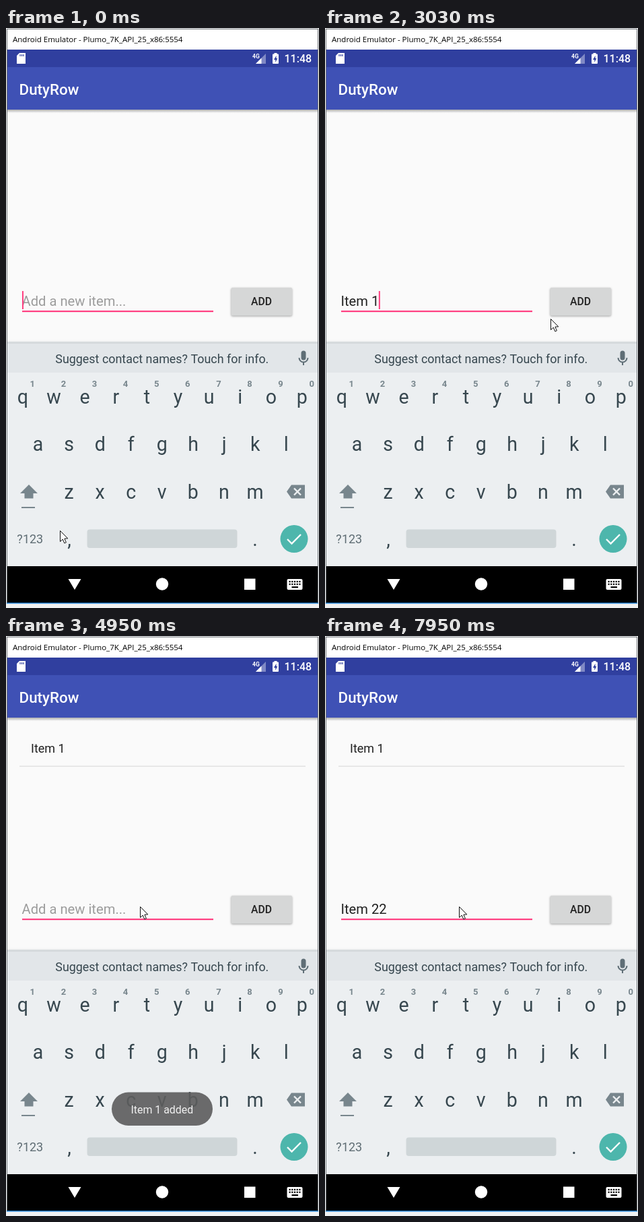
An HTML page with a canvas for the animation above (8000 ms loop, 465 by 860 pixels).

```html
<!DOCTYPE html>
<html lang="en">
<head>
<meta charset="utf-8">
<style>
html, body { margin: 0; width: 100%; height: 100%; overflow: hidden; background: #fafafa; }
canvas { display: block; }
</style>
</head>
<body>
<canvas id="stage" width="465" height="860"></canvas>
<script>
const ctx = document.getElementById('stage').getContext('2d');
const LOOP = 8000;
const INK = '#37474f', KEY_ICON = '#78868d', KEYBOARD = '#eceff1', ACCENT = '#ff4081';

// Each track holds its value until the next start time.
const typed = [[0, ''], [1240, 'I'], [1360, 'It'], [1480, 'Ite'], [1600, 'Item'], [1750, 'Item 1'],
  [3570, ''], [5620, 'I'], [5770, 'It'], [5920, 'Ite'], [6080, 'Item'], [6350, 'Item 2'], [6500, 'Item 22']];
const caretFlips = [400, 960, 2340, 2760, 3310, 3570, 3990, 4410, 4950, 5620, 7020, 7520, 7950];
const toastAlpha = [[0, 0], [3870, 0.35], [3990, 0.75], [4140, 1], [5620, 0.92], [5770, 0.4], [5920, 0]];
const pointer = [[0, [80, 745]], [2460, [72, 679]], [2610, [77, 664]], [2760, [144, 548]], [2910, [250, 480]],
  [3030, [335, 431]], [3180, [350, 418]], [3310, [362, 412]], [3990, [290, 412]], [4140, [215, 408]],
  [4410, [202, 401]], [4680, [199, 401]]];

const at = (track, t) => track.findLast(([start]) => start <= t)[1];

function rect(x, y, w, h, color) {
  ctx.fillStyle = color;
  ctx.fillRect(x, y, w, h);
}
function round(x, y, w, h, r, color) {
  ctx.fillStyle = color;
  ctx.beginPath();
  ctx.roundRect(x, y, w, h, r);
  ctx.fill();
}
function disc(x, y, r, color) {
  ctx.fillStyle = color;
  ctx.beginPath();
  ctx.arc(x, y, r, 0, 7);
  ctx.fill();
}
function trace(points) {
  ctx.beginPath();
  points.forEach(([x, y]) => ctx.lineTo(x, y));
}
function poly(points, color) {
  trace(points);
  ctx.closePath();
  ctx.fillStyle = color;
  ctx.fill();
}
function line(points, color, width) {
  trace(points);
  ctx.strokeStyle = color;
  ctx.lineWidth = width;
  ctx.stroke();
}
function text(str, x, y, size, color, { weight = 400, align = 'left', family = 'Roboto' } = {}) {
  ctx.font = `${weight} ${size}px "${family}", sans-serif`;
  ctx.textAlign = align;
  ctx.fillStyle = color;
  ctx.fillText(str, x, y);
}
function fade(y, h, from, to) {
  const g = ctx.createLinearGradient(0, y, 0, y + h);
  g.addColorStop(0, from);
  g.addColorStop(1, to);
  rect(2, y, 461, h, g);
}

function drawWindow() {
  rect(0, 0, 465, 860, '#f1f2f3');
  rect(1, 1, 463, 852, '#707478');
  rect(2, 2, 461, 30, '#fff');
  text('Android Emulator - Plumo_7K_API_25_x86:5554', 10, 21, 11.5, '#000', { family: 'Open Sans' });
  rect(2, 32, 461, 433, '#fafafa');
  rect(1, 852, 463, 1.5, '#1979ca');
}

function drawStatusBar() {
  rect(2, 32, 461, 26, '#303f9f');
  poly([[20, 37], [29, 37], [29, 53], [16, 53], [16, 41]], '#fff');
  for (const x of [20.5, 23, 25.5]) rect(x, 39, 1.2, 3, '#303f9f');
  text('4G', 366, 45, 8.5, '#fff', { weight: 700 });
  poly([[386, 38], [386, 53], [371, 53]], '#8089c5');
  poly([[379.5, 44.5], [379.5, 53], [371, 53]], '#fff');
  rect(398.5, 37, 4, 2, '#fff');
  round(396, 38.5, 9, 14.5, 1, '#fff');
  poly([[401.5, 41], [398, 47], [400.3, 47], [400.3, 51], [403.3, 45], [401.5, 45]], '#303f9f');
  text('11:48', 413.5, 51, 16, '#fff', { weight: 500 });
}

function drawAppBar() {
  rect(2, 58, 461, 63, '#3f51b5');
  fade(121, 5, 'rgba(0,0,0,.3)', 'rgba(0,0,0,0)');
  text('DutyRow', 19.5, 98.5, 22.4, '#fff', { weight: 500 });
}

function drawList() {
  text('Item 1', 37, 173, 18, '#212121');
  rect(20, 192.5, 425, 1.3, '#dedede');
}

function drawInput(value, caret) {
  text(value || 'Add a new item...', 23.5, 411.5, 20.2, value ? '#212121' : '#9c9c9c');
  rect(24, 419, 284, 2.2, ACCENT);
  if (caret) rect(value ? 23.5 + ctx.measureText(value).width - 0.5 : 24, 390, 2, 27, ACCENT);
}

function drawButton(pressed) {
  ctx.save();
  ctx.shadowColor = 'rgba(0,0,0,.35)';
  ctx.shadowBlur = pressed ? 6 : 3;
  ctx.shadowOffsetY = pressed ? 2 : 1;
  round(334.5, 385, 90.5, 41.5, 2.2, pressed ? '#c3c4c4' : '#d6d7d7');
  ctx.restore();
  text('ADD', 379.5, 411, 15.7, '#212121', { weight: 500, align: 'center' });
}

function drawSuggestions() {
  rect(2, 465, 461, 46, '#e2e6e9');
  fade(462, 6, 'rgba(0,0,0,0)', 'rgba(0,0,0,.07)');
  text('Suggest contact names? Touch for info.', 231.8, 497, 17.9, INK, { align: 'center' });
  const gray = '#5f6e76';
  round(438.5, 478.5, 7, 14, 3.5, gray);
  ctx.strokeStyle = gray;
  ctx.lineWidth = 2;
  ctx.beginPath();
  ctx.arc(442, 489, 6.5, 0, Math.PI);
  ctx.stroke();
  rect(441, 495, 2, 5, gray);
}

function drawKeyRow(letters, x, y) {
  [...letters].forEach((c, i) => text(c, x + i * 46.1, y, 28.6, INK, { align: 'center' }));
}

function drawKeyboard() {
  rect(2, 511, 461, 287, KEYBOARD);
  drawKeyRow('qwertyuiop', 25, 556.5);
  drawKeyRow('asdfghjkl', 47.5, 627);
  drawKeyRow('zxcvbnm', 93.5, 697.5);
  drawKeyRow(',', 94, 767.5);
  drawKeyRow('.', 370, 767.5);
  [...'1234567890'].forEach((c, i) =>
    text(c, 39.3 + i * 46.1, 532, 13, KEY_ICON, { weight: 700, align: 'center' }));

  poly([[34, 677], [47, 690], [40.5, 690], [40.5, 697.5], [27.5, 697.5], [27.5, 690], [21, 690]], KEY_ICON);
  rect(23, 710, 20, 2, KEY_ICON);
  poly([[417, 687.5], [424, 677.5], [444, 677.5], [444, 697.5], [424, 697.5]], KEY_ICON);
  line([[428, 682.5], [438, 692.5]], KEYBOARD, 2.4);
  line([[438, 682.5], [428, 692.5]], KEYBOARD, 2.4);

  text('?123', 35.8, 764, 18, '#5f6d74', { align: 'center' });
  round(120.5, 743.5, 223, 27.5, 4, '#cfd6d8');
  disc(428, 757.5, 20.5, '#4db6ac');
  line([[418, 758], [424.5, 764.5], [438, 751]], '#fff', 2.4);
}

function drawNavBar() {
  rect(2, 798, 461, 54, '#000');
  poly([[92.5, 817], [111.5, 817], [102, 833]], '#fff');
  disc(232, 824.5, 9.2, '#fff');
  rect(354, 816.5, 16.5, 16.5, '#fff');
  round(417.5, 817, 23, 16, 2, '#fff');
  for (let i = 0; i < 5; i++) {
    rect(420.5 + i * 3.7, 819.8, 2.2, 2.2, '#000');
    rect(420.5 + i * 3.7, 823.6, 2.2, 2.2, '#000');
  }
  rect(424.5, 828, 9.5, 2.2, '#000');
}

function drawToast(alpha) {
  ctx.save();
  ctx.globalAlpha = alpha * 0.9;
  round(157, 676.5, 150, 49.5, 24.7, '#5c5c5c');
  ctx.globalAlpha = alpha;
  text('Item 1 added', 231.8, 708, 15.9, '#f0f0f0', { align: 'center' });
  ctx.restore();
}

function drawPointer([x, y]) {
  const shape = [[0, 0], [0, 16], [3.8, 12.6], [6.3, 18.4], [8.9, 17.3], [6.4, 11.6], [11.3, 11.4]]
    .map(([dx, dy]) => [x + 0.5 + dx, y + 0.5 + dy]);
  poly(shape, '#fff');
  line([...shape, shape[0]], '#111', 1);
}

function draw(t) {
  const caret = caretFlips.filter(flip => flip <= t).length % 2 === 0;
  drawWindow();
  drawStatusBar();
  drawAppBar();
  if (t >= 3570) drawList();
  drawInput(at(typed, t), caret);
  drawButton(t >= 3450 && t < 3870);
  drawSuggestions();
  drawKeyboard();
  drawNavBar();
  drawToast(at(toastAlpha, t));
  drawPointer(at(pointer, t));
}

const start = performance.now();
function tick() {
  draw((performance.now() - start) % LOOP);
  requestAnimationFrame(tick);
}
tick();
</script>
</body>
</html>
```
